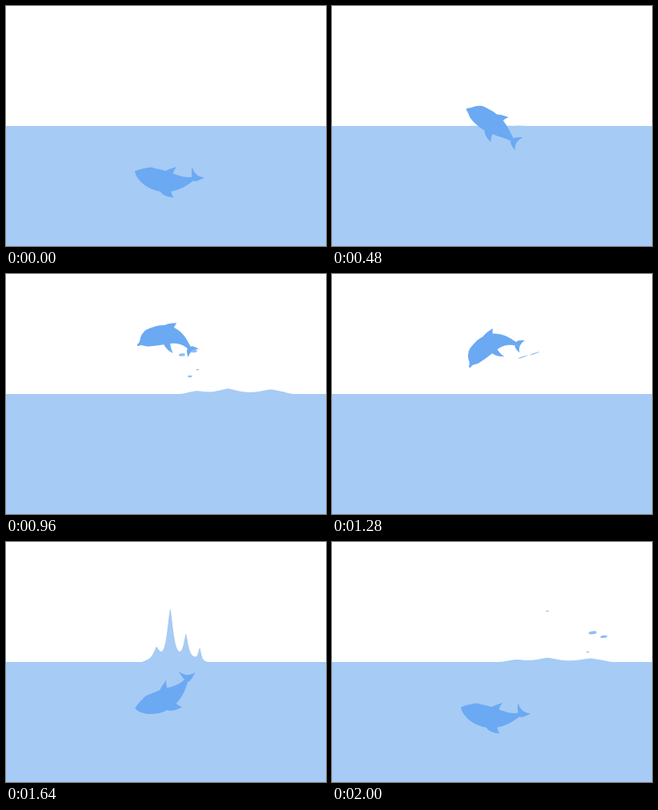
These frames come from a looping animation (400x300 px, 2040 ms). An HTML page with a canvas:

```html
<!DOCTYPE html>
<html lang="en">
<head>
<meta charset="utf-8">
<title>Leaping dolphin</title>
<style>
html, body { margin: 0; width: 100%; height: 100%; overflow: hidden; background: #fff; }
canvas { display: block; width: 400px; height: 300px; }
</style>
</head>
<body>
<canvas id="stage" width="400" height="300"></canvas>
<script>
const ctx = document.getElementById('stage').getContext('2d');
const LOOP = 2040, STEP = 40, SEA = 150;
const WATER = '#a6cbf5', SKIN = '#6ba9f3', DROP = '#8fbef5';

const lerp = (a, b, f) => a + (b - a) * f;
const clamp = v => Math.max(0, Math.min(1, v));
const smooth = v => { v = clamp(v); return v * v * (3 - 2 * v); };
const hump = (d, w) => Math.exp(-(Math.abs(d / w) ** 1.5));

// Path of the dolphin's middle, with its heading in radians.
const PATH = [
  { t: 0, x: 198, y: 211.5, turn: .12 },
  { t: 280, x: 202, y: 199.5, turn: .54 },
  { t: 640, x: 193.5, y: 108.8, turn: .53 },
  { t: 960, x: 197, y: 90.5, turn: .05 },
  { t: 1280, x: 201, y: 101.5, turn: -.46 },
  { t: 1640, x: 194, y: 190.5, turn: -.51 },
  { t: 2000, x: 198, y: 211.5, turn: .12 }
];

function pathKey(i) {
  const n = PATH.length, lap = Math.floor(i / n), p = PATH[i - lap * n];
  return { ...p, t: p.t + lap * LOOP };
}

// Cubic interpolation along the path, wrapping round the loop.
function placeAt(t) {
  let i = PATH.length - 1;
  while (PATH[i].t > t) i--;
  const [a, b, c, d] = [-1, 0, 1, 2].map(k => pathKey(i + k));
  const span = c.t - b.t, f = (t - b.t) / span, f2 = f * f, f3 = f2 * f;
  const mix = k => (2 * f3 - 3 * f2 + 1) * b[k] + (3 * f2 - 2 * f3) * c[k]
    + (f3 - 2 * f2 + f) * (c[k] - a[k]) / (c.t - a.t) * span
    + (f3 - f2) * (d[k] - b[k]) / (d.t - b.t) * span;
  return { x: mix('x'), y: mix('y'), turn: mix('turn') };
}

// Half width of the body at s, from nose (0) to tail (1); beak and brow show in the air.
function girth(s, back, wet) {
  const beak = lerp(smooth(s / .1), 1, wet);
  const body = s ** .8 * (1 - s) ** 1.4 * (back ? 47 : 41) * beak;
  const brow = back ? 1.5 * hump(s - .17, .08) : 0;
  return (1.4 + s + body + brow) * (1 + .1 * wet);
}

function drawDolphin(t) {
  const { x, y, turn } = placeAt(t);
  // Under water the body is longer, bends the other way and the fluke is turned up.
  const wet = smooth((y - 115) / 65);
  const half = 32 + 4 * wet, bend = lerp(28, -17, wet), skew = 8;

  // Point on the skin: side 1 is the back, -1 the belly.
  const skin = (s, side, extra = 0) => {
    const r = 1 - s;
    const tx = r * (skew + half) + s * (half - skew), ty = (s - r) * bend;
    const w = side * (girth(s, side > 0, wet) + extra) / Math.hypot(tx, ty);
    return [(s * s - r * r) * half + 2 * r * s * skew + ty * w, -2 * r * s * bend - tx * w];
  };
  const fin = (side, from, to, tipX, tipY, swell) => {
    const end = skin(to, side, -3);
    ctx.beginPath();
    ctx.moveTo(...skin(from, side, -3));
    ctx.lineTo(...skin(from, side));
    ctx.quadraticCurveTo(...skin(from + .05, side, swell), tipX, tipY);
    ctx.quadraticCurveTo(lerp(tipX, end[0], .5) - 2, lerp(tipY, end[1], .5), ...end);
    ctx.fill();
  };

  ctx.save();
  ctx.translate(x, y);
  ctx.rotate(turn);
  ctx.fillStyle = SKIN;
  fin(1, .45, .6, 15 - wet, -bend / 2 - 16 - 5 * wet, 3);
  fin(-1, .42, .58, 12 + 3 * wet, -bend / 2 + 22 - 4 * wet, 6);

  const tail = Math.atan2(bend, half - skew), flick = .45 * wet;
  const reach = (angle, len) =>
    [half + len * Math.cos(tail + angle), len * Math.sin(tail + angle)];
  const span = 12 + 3 * wet, n = 60;

  ctx.beginPath();
  ctx.moveTo(...skin(0, 1));
  for (let i = 1; i <= n; i++) ctx.lineTo(...skin(i / n, 1));
  ctx.quadraticCurveTo(...skin(1, 1, 3), ...reach(-.77 - flick, span));
  ctx.quadraticCurveTo(...reach(0, 3), ...reach(.77 - flick, span));
  ctx.quadraticCurveTo(...skin(1, -1, 3), ...skin(1, -1));
  for (let i = n - 1; i >= 0; i--) ctx.lineTo(...skin(i / n, -1));
  ctx.quadraticCurveTo(-half - 2, bend / 20, ...skin(0, 1));
  ctx.fill();
  ctx.restore();
}

// Crests: place along the splash (0 to 1), height, width in front and behind.
const crest = (u, h, front, behind = front) => ({ u, h, front, behind });
const RIPPLE = [crest(.16, 3.6, .1), crest(.43, 6.6, .125), crest(.8, 5.6, .135), crest(.9, 0, .1)];

// Edges move at a steady pace: position at the peak, then speed per ms.
const SPLASHES = [
  { peak: 640, left: 183, right: 285, pace: [.1, .235], mound: 4, lean: .2,
    crests: [crest(.09, 10, .015, .12), crest(.255, 33, .02, .21), crest(.79, 15, .02, .13)],
    drops: [[220, 101, 4], [235, 96.5, 4], [230, 128, 2.8], [239.5, 119.5, 1.8]], wind: .057 },
  { peak: 1640, left: 170, right: 252, pace: [.103, .278], mound: 11, lean: 0,
    crests: [crest(.22, 12, .055), crest(.43, 56, .06), crest(.67, 26, .045), crest(.88, 14, .03)],
    drops: [[264.5, 86, 1.8], [321, 113, 4.8], [335, 118, 4], [315, 137, 2]], wind: .12 }
];
const RISE = 180, SINK = 320, FADE = 200;

// The crests rise, sink into a ripple, then die away.
function drawSplash(s, t) {
  const age = t - s.peak;
  if (age <= -RISE || age >= SINK + FADE) return;
  const f = smooth(age / SINK);
  const power = smooth((age + RISE) / RISE) * clamp((SINK + FADE - age) / FADE);
  const left = s.left + s.pace[0] * age, right = s.right + s.pace[1] * age;
  const waves = s.crests.map((c, i) => {
    const r = RIPPLE[i], mix = k => lerp(c[k], r[k], f);
    return crest(mix('u'), mix('h'), mix('front'), mix('behind'));
  });

  ctx.fillStyle = WATER;
  ctx.beginPath();
  ctx.moveTo(left, SEA + 1);
  for (let u = 0; u <= 1; u += .004) {
    const edge = clamp(12 * Math.min(u, 1 - u));
    let h = s.mound * (1 - f) * Math.sin(Math.PI * u);
    for (const w of waves) h += edge * w.h * hump(u - w.u, u < w.u ? w.front : w.behind);
    h *= power;
    ctx.lineTo(lerp(left, right, u) - h * s.lean * (1 - f), SEA - h);
  }
  ctx.lineTo(right, SEA + 1);
  ctx.fill();
}

// Drops fly with the wind, stretch and thin out; big ones last longer.
function drawDrops(s, t) {
  const age = t - s.peak - SINK;
  ctx.fillStyle = DROP;
  for (const [x, y, size] of s.drops) {
    const life = size * 90, grow = clamp((age + 240) / 200);
    if (grow <= 0 || age >= life) continue;
    const late = Math.max(0, age);
    ctx.beginPath();
    ctx.ellipse(x + s.wind * age, y + .009 * age, (size + late * .008) * grow,
      Math.max(.7, size * .45 * (1 - late / life)) * grow, -.1 - late * .0007, 0, Math.PI * 2);
    ctx.fill();
  }
}

function draw(t) {
  ctx.fillStyle = '#fff';
  ctx.fillRect(0, 0, 400, 300);
  ctx.fillStyle = WATER;
  ctx.fillRect(0, SEA, 400, 300 - SEA);
  SPLASHES.forEach(s => drawSplash(s, t));
  drawDolphin(t);
  SPLASHES.forEach(s => drawDrops(s, t));
}

const begin = performance.now();
function tick() {
  const t = (performance.now() - begin) % LOOP;
  draw(Math.floor(t / STEP) * STEP);
  requestAnimationFrame(tick);
}
tick();
</script>
</body>
</html>
```
